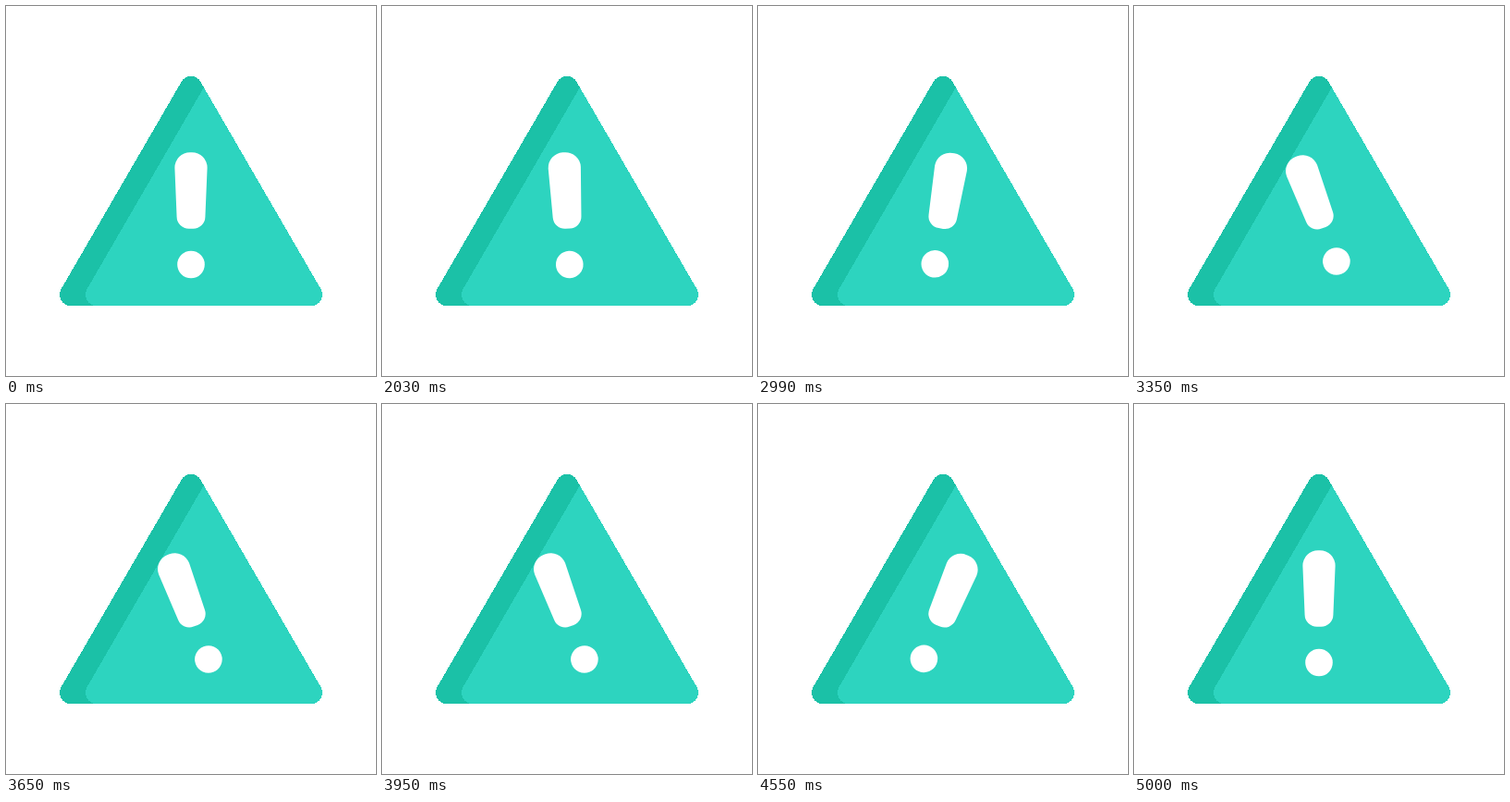
Write an HTML page without scripts that moves like this. It is 400x400 px and loops after 5.03 s.

```html
<!DOCTYPE html>
<html lang="en">
<head>
<meta charset="utf-8">
<title>Warning sign</title>
<style>
  html, body { margin: 0; width: 100%; height: 100%; overflow: hidden; background: #fff; }
  svg { display: block; width: 100%; height: 100%; }
  .sign { shape-rendering: crispEdges; }
  .shade { fill: #1bc1a7; }
  .face { fill: #2dd4bf; }
  .mark { fill: #fff; }
</style>
</head>
<body>
<svg viewBox="0 0 400 400">
  <g class="sign">
    <path class="shade" d="M59.6 306L189.6 82A12 12 0 0 1 210.4 82L213.9 88L120 300L110 324H70A12 12 0 0 1 59.6 306Z"/>
    <path class="face" d="M213.9 88L340.4 306A12 12 0 0 1 330 324H98A12 12 0 0 1 87.6 306Z"/>
  </g>
  <g class="mark" transform="translate(200 226.5)">
    <g>
      <path d="M-17.6 -51.8A16.5 16.5 0 0 1 -1.1 -68.3H1.1A16.5 16.5 0 0 1 17.6 -51.8L15.4 1.5A13 13 0 0 1 2.4 14.2H-2.4A13 13 0 0 1 -15.4 1.5Z"/>
      <circle cy="53" r="14.8"/>
      <!-- tip left, rock seven times, tip right, settle; then rest and repeat -->
      <animateTransform id="tip" attributeName="transform" type="rotate" values="0;-30"
        begin="1.992s;settle.end+2.03s" dur=".2s"
        calcMode="spline" keyTimes="0;1" keySplines=".333 0 .667 1"/>
      <animateTransform id="rock" attributeName="transform" type="rotate" values="-30;30;-30"
        begin="tip.end" dur=".3s" repeatCount="7"
        calcMode="spline" keyTimes="0;.445;1" keySplines=".333 0 .667 1;.333 0 .667 1"/>
      <animateTransform id="swing" attributeName="transform" type="rotate" values="-30;30"
        begin="rock.end" dur=".134s"
        calcMode="spline" keyTimes="0;1" keySplines=".333 0 .667 1"/>
      <animateTransform id="settle" attributeName="transform" type="rotate" values="30;0"
        begin="swing.end" dur=".566s"
        calcMode="spline" keyTimes="0;1" keySplines=".333 0 .2 1"/>
    </g>
  </g>
</svg>
</body>
</html>
```
